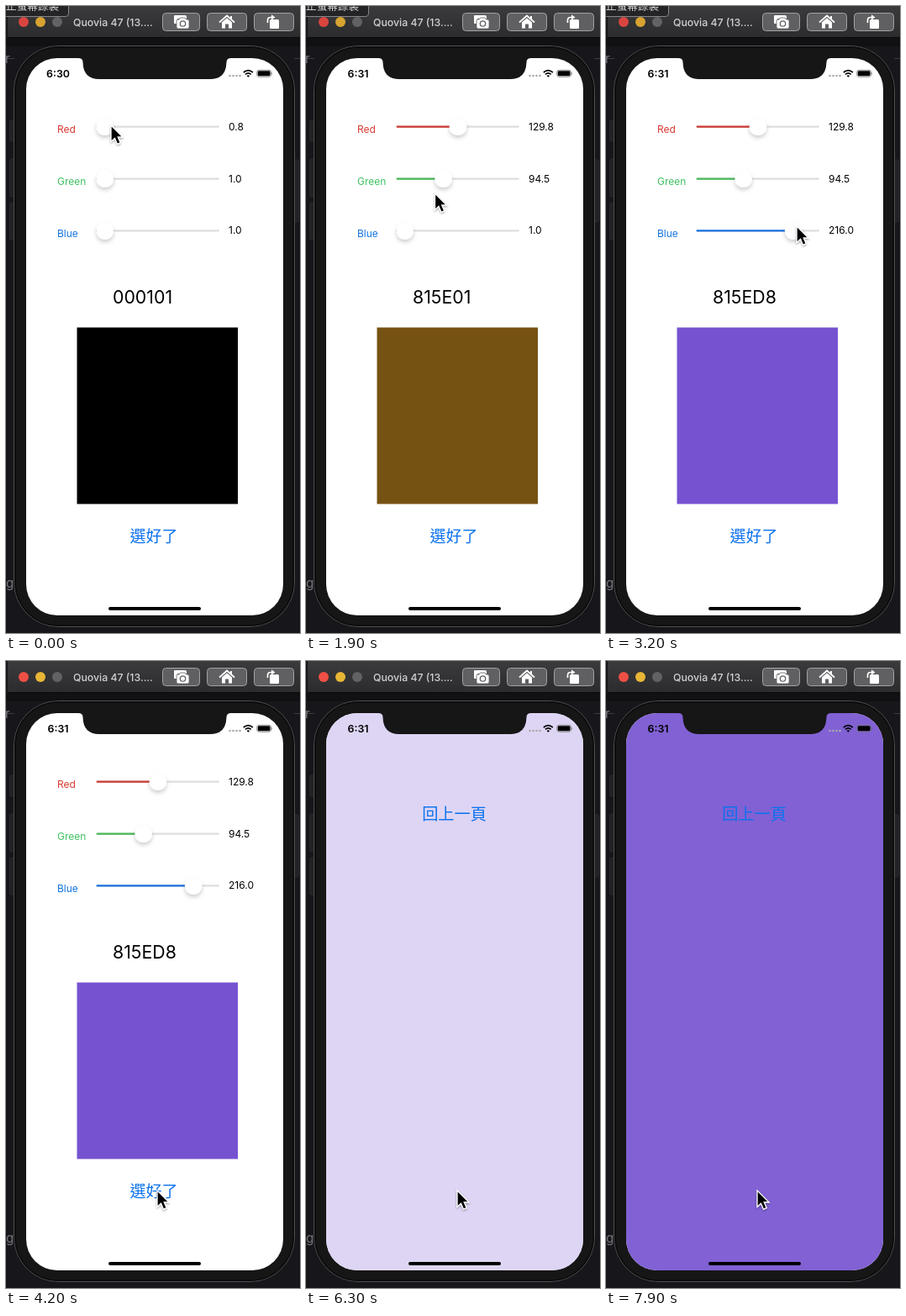
Recreate the animation shown at these times as an HTML page. Size 350 px wide and 746 px high, loop 8 s.

```html
<!DOCTYPE html>
<html lang="zh-Hant">
<head>
<meta charset="utf-8">
<title>Color picker</title>
<style>
  html, body { margin: 0; width: 100%; height: 100%; overflow: hidden; background: #17171b; }
  svg { display: block; width: 350px; height: 746px; font-family: Inter, "Noto Sans CJK TC", "Noto Sans CJK", sans-serif; }
  .cjk { font-family: "Noto Sans CJK TC", "Noto Sans CJK", sans-serif; fill: #0b72ee; text-anchor: middle; }
</style>
</head>
<body>
<svg viewBox="0 0 350 746">
  <defs>
    <linearGradient id="bar" x2="0" y2="1">
      <stop stop-color="#3b3b3d"/><stop offset="1" stop-color="#2c2c2e"/>
    </linearGradient>
    <filter id="thumbShadow" x="-60%" y="-60%" width="220%" height="240%">
      <feDropShadow dx="0" dy="3" stdDeviation="2.6" flood-color="#000" flood-opacity=".2"/>
    </filter>
    <filter id="cursorShadow" x="-50%" y="-30%" width="200%" height="180%">
      <feDropShadow dx="0" dy="1.2" stdDeviation="1" flood-color="#000" flood-opacity=".4"/>
    </filter>
    <clipPath id="screen"><rect x="24" y="62" width="306" height="663" rx="37"/></clipPath>
  </defs>

  <!-- desktop -->
  <rect width="350" height="746" fill="#17171b"/>
  <rect y="38" width="350" height="10" fill="#111113"/>
  <path d="M0 62.5H10M343 62.5H350" stroke="#3c3c40"/>
  <g fill="#75757c" font-size="15">
    <text x="-1" y="68">r</text>
    <text x="0" y="692">g</text>
  </g>

  <!-- window bar -->
  <path d="M2 37V0H350V37Z" fill="url(#bar)"/>
  <path d="M2 37.5H350" stroke="#09090a"/>
  <g id="lights">
    <circle cx="21" cy="19" r="6"/><circle cx="41" cy="19" r="6"/><circle cx="61" cy="19" r="6" fill="#626264"/>
  </g>
  <text x="80" y="24" font-size="12.3" font-weight="500" fill="#d2d2d3">Quovia 47 (13....</text>
  <g fill="#606062" stroke="#a2a2a4">
    <rect x="186.5" y="8.5" width="44" height="21" rx="4"/>
    <rect x="239.5" y="8.5" width="47" height="21" rx="4"/>
    <rect x="295.5" y="8.5" width="47" height="21" rx="4"/>
  </g>
  <g fill="#fff">
    <path d="M201 11H213Q215 11 215 13V15H204V21H201Q200 21 200 20V12Q200 11 201 11Z"/>
    <path d="M204 16H206L207.5 14H213L214.5 16H216Q218 16 218 18V25Q218 27 216 27H205Q203 27 203 25V18Q203 16 204 16Z" stroke="#606062" stroke-width=".8"/>
    <circle cx="210.5" cy="21" r="3.2" fill="none" stroke="#606062" stroke-width="1.3"/>
    <path d="M254 19.5L263 11.5L272 19.5" fill="none" stroke="#fff" stroke-width="1.8"/>
    <path d="M257 19.5L263 14.3L269 19.5V26.5H265V21.5H261V26.5H257ZM267 12H269V16L267 14.5Z"/>
    <rect x="314" y="16" width="11" height="11" rx="1.5"/>
    <path d="M311.5 20V17Q311.5 13.5 315 13.5H317" fill="none" stroke="#fff" stroke-width="1.7"/>
    <path d="M316 10.2L320.5 13.5L316 16.6Z"/>
  </g>
  <g id="tip">
    <path d="M-5 -5H74.5V9Q74.5 12.5 71 12.5H-5Z" fill="#242426" stroke="#87878a"/>
    <text x="63" y="4" font-size="12.6" text-anchor="end" fill="#d5d5d7" font-family="Noto Sans CJK TC, Noto Sans CJK, sans-serif">停止螢幕錄製</text>
  </g>

  <!-- phone -->
  <g fill="#222225" stroke="#2f2f33" stroke-width=".7">
    <rect x="4.5" y="136" width="7" height="25" rx="2"/>
    <rect x="4.5" y="182" width="7" height="45" rx="2"/>
    <rect x="4.5" y="234" width="7" height="44" rx="2"/>
    <rect x="342" y="183" width="6.5" height="74" rx="2"/>
  </g>
  <rect x="9.5" y="47.5" width="334" height="691" rx="53" fill="#161617" stroke="#505052"/>
  <rect x="11" y="49" width="331" height="688" rx="51.5" fill="none" stroke="#0b0b0c" stroke-width="1.5"/>

  <g clip-path="url(#screen)">
    <rect x="24" y="62" width="306" height="663" fill="#fff"/>
    <g id="sliders"></g>
    <text id="hex" x="127" y="354" font-size="21.3"></text>
    <rect id="swatch" x="84.5" y="382.5" width="191.5" height="210"/>
    <text id="done" class="cjk" x="176" y="638" font-size="19">選好了</text>
    <g id="page">
      <rect id="paper" x="24" y="62" width="306" height="663"/>
      <text class="cjk" x="176.5" y="189" font-size="19.2">回上一頁</text>
    </g>
  </g>

  <path d="M86 61V62Q91.500 62 91.500 67Q92 87 111 87H243Q262 87 262.500 67Q262.500 62 268 62V61Z" fill="#161617"/>
  <text id="clock" x="62" y="84.500" font-size="12.400" font-weight="600" text-anchor="middle"></text>
  <g fill="#a9a9ad">
    <circle cx="266.500" cy="83" r="1.300"/><circle cx="270.500" cy="83" r="1.300"/>
    <circle cx="274.500" cy="83" r="1.300"/><circle cx="278.500" cy="83" r="1.300"/>
  </g>
  <g fill="none" stroke="#000" stroke-width="1.700">
    <path d="M282.800 79Q288.300 74.300 293.800 79"/>
    <path d="M284.900 81.300Q288.300 78.400 291.700 81.300"/>
  </g>
  <path d="M286.500 82.900Q288.300 81.600 290.100 82.900L288.300 84.800Z"/>
  <rect x="298.700" y="76.300" width="16.800" height="8" rx="2.400" fill="none" stroke="#777" stroke-width=".8"/>
  <rect x="299.700" y="77.300" width="14.800" height="6" rx="1.400"/>
  <path d="M316.500 78.700Q318 80.300 316.500 82Z" fill="#555"/>
  <rect x="122" y="715" width="110" height="4" rx="2"/>

  <g id="cursor" filter="url(#cursorShadow)">
    <path d="M0 0V19.500L4.500 15.300L7.500 22.300L11.200 20.700L8.200 14H14Z" stroke="#fff" stroke-width="1.300"/>
  </g>
</svg>
<script>
const LOOP = 8000, STEP = 100;
const $ = id => document.getElementById(id);

// [time, value]
const channels = [
  { name: 'Red', y: 143.5, label: '#d93a31', track: '#cb3a34',
    keys: [[100, .8], [300, 30], [600, 105], [800, 129.8]] },
  { name: 'Green', y: 205.5, label: '#3fc263', track: '#48b957',
    keys: [[1100, 1], [1200, 1.5], [1500, 52], [1800, 94.5]] },
  { name: 'Blue', y: 267.3, label: '#1273df', track: '#1b72e2',
    keys: [[2200, 1], [2500, 100], [2800, 186], [3200, 216]] }
];

// [time, x, y]
const cursorKeys = [
  [100, 125, 142], [300, 139, 142], [600, 176, 142], [800, 188, 142],
  [950, 152, 176], [1100, 120, 206], [1200, 120, 206], [1500, 145, 206], [1800, 166, 206],
  [2000, 141, 240], [2200, 121, 262], [2500, 170, 262], [2800, 212, 262], [3200, 227, 262],
  [3400, 225, 285], [3700, 198, 520], [4000, 180, 630]
];

const ink = [117, 82, 208];
const thumbX = v => 117.8 + .49 * (v - 1);
const clamp = x => Math.min(1, Math.max(0, x));
const rgb = c => `rgb(${c.map(Math.round)})`;

function at(keys, t, col = 1) {
  const i = keys.findIndex(k => k[0] >= t);
  if (i < 0) return keys[keys.length - 1][col];
  if (i === 0) return keys[0][col];
  const a = keys[i - 1], b = keys[i];
  return a[col] + (b[col] - a[col]) * (t - a[0]) / (b[0] - a[0]);
}

// cubic-bezier(.42, 0, .58, 1)
function easeInOut(x) {
  let lo = 0, hi = 1;
  for (let i = 0; i < 24; i++) {
    const s = (lo + hi) / 2, r = 1 - s;
    if (1.26 * s * r * r + 1.74 * s * s * r + s ** 3 < x) lo = s; else hi = s;
  }
  return lo * lo * (3 - 2 * lo);
}

function add(tag, attrs, text = '') {
  const el = document.createElementNS('http://www.w3.org/2000/svg', tag);
  for (const k in attrs) el.setAttribute(k, attrs[k]);
  el.textContent = text;
  $('sliders').append(el);
  return el;
}

for (const c of channels) {
  const bar = { x: 107.5, y: c.y - 1, height: 2.2, rx: 1.1 };
  add('text', { x: 61, y: c.y + 7.6, 'font-size': 12, fill: c.label }, c.name);
  add('rect', { ...bar, width: 146.5, fill: '#dedee0' });
  c.fill = add('rect', { ...bar, fill: c.track });
  c.thumb = add('circle', { cy: c.y + .3, r: 10.3, fill: '#fff', filter: 'url(#thumbShadow)' });
  c.text = add('text', { x: 265, y: c.y + 4, 'font-size': 12 });
}

function swatchColor([r, g, b]) {
  return r < 1 ? [0, 0, 0] : [
    r * .907,
    g < 2 ? 20 * clamp(r / 129) : 20 + 62 * g / 94.5,
    Math.max(18 * clamp(r / 129), 208 * (b / 216) ** 3.6)
  ];
}

function draw(t) {
  const values = channels.map(c => at(c.keys, t));
  channels.forEach((c, i) => {
    const x = thumbX(values[i]);
    c.fill.setAttribute('width', x - 107.5);
    c.thumb.setAttribute('cx', x);
    c.text.textContent = values[i].toFixed(1);
  });
  $('hex').textContent = values.map(v => Math.floor(v).toString(16).padStart(2, '0')).join('').toUpperCase();
  $('swatch').setAttribute('fill', rgb(swatchColor(values)));
  $('clock').textContent = t < 600 ? '6:30' : '6:31';

  const early = t < 3800;
  $('tip').style.display = early ? '' : 'none';
  const [red, yellow] = $('lights').children;
  red.setAttribute('fill', early ? '#d9453f' : '#f04f45');
  yellow.setAttribute('fill', early ? '#d8a331' : '#e8b637');

  $('done').style.opacity = t >= 4400 && t < 4600 ? .3 : 1;
  const rise = 1 - (1 - clamp((t - 4600) / 500)) ** 3;
  $('page').style.display = rise > 0 ? '' : 'none';
  $('page').setAttribute('transform', `translate(0 ${663 * (1 - rise)})`);
  const tint = easeInOut(clamp((t - 5110) / 3500));
  $('paper').setAttribute('fill', rgb(ink.map(v => 255 + (v - 255) * tint)));

  $('cursor').setAttribute('transform', `translate(${at(cursorKeys, t)} ${at(cursorKeys, t, 2)})`);
}

const start = performance.now();
function tick(now) {
  const t = Math.max(0, now - start) % LOOP;
  draw(Math.floor(t / STEP) * STEP);
  requestAnimationFrame(tick);
}
draw(0);
requestAnimationFrame(tick);
</script>
</body>
</html>
```
